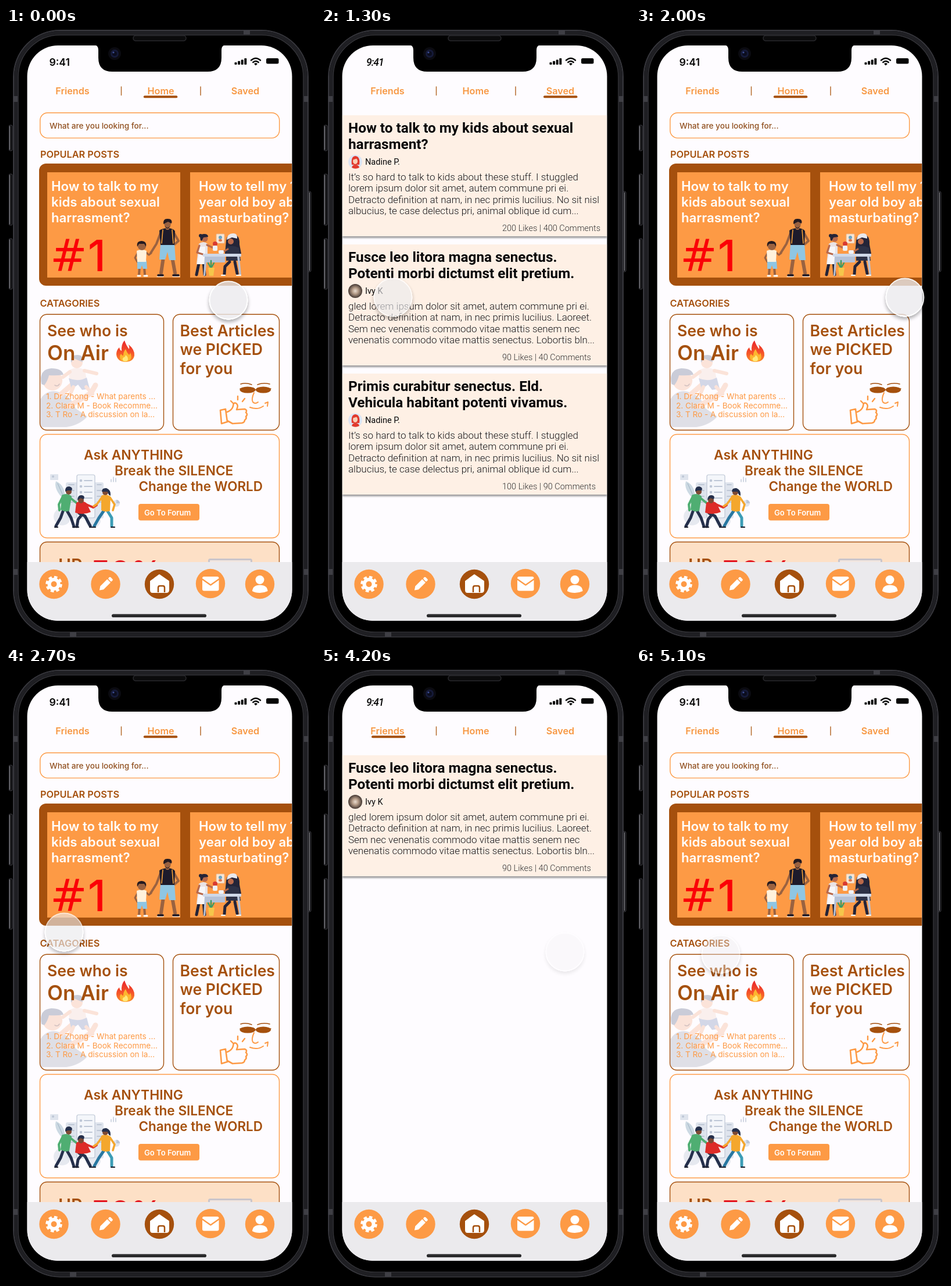
Recreate the animation shown at these times as an HTML page. Size 532x1052 px, loop 5200 ms.

```html
<!DOCTYPE html>
<html lang="en">
<head>
<meta charset="utf-8">
<title>Parenting app swipe</title>
<style>
html, body { margin: 0; width: 100%; height: 100%; overflow: hidden; background: #000; }
svg { display: block; width: 100%; height: 100%; }
text { white-space: pre; }
.ui { font-family: Inter, "Open Sans", sans-serif; font-weight: 600; }
.post { font-family: Roboto, Arial, sans-serif; }
.head { font-size: 24.3px; font-weight: 700; fill: #060608; }
.name { font-size: 14.5px; fill: #060608; }
.body { font-size: 17px; font-weight: 300; fill: #17171a; }
.likes { font-size: 14.5px; font-weight: 300; fill: #333; }
</style>
</head>
<body>
<svg id="stage" viewBox="0 0 532 1052"></svg>
<script>
const ORANGE = '#fd9a45', BROWN = '#a5500d', PAGE = '#fefcff', PITCH = 456.4;

const p = (d, fill, extra = '') => `<path d="${d}" fill="${fill}" ${extra}/>`;
const line = (d, color, w) => p(d, 'none', `stroke="${color}" stroke-width="${w}" stroke-linecap="round" stroke-linejoin="round"`);
const dot = (x, y, r, fill) => `<circle cx="${x}" cy="${y}" r="${r}" fill="${fill}"/>`;
const oval = (x, y, rx, ry, fill) => `<ellipse cx="${x}" cy="${y}" rx="${rx}" ry="${ry}" fill="${fill}"/>`;
const box = (x, y, w, h, r, fill, stroke = 'none', sw = 1.4) =>
  `<rect x="${x}" y="${y}" width="${w}" height="${h}" rx="${r}" fill="${fill}" stroke="${stroke}" stroke-width="${sw}"/>`;
const ui = (x, y, size, color, s, extra = '') =>
  `<text class="ui" x="${x}" y="${y}" font-size="${size}" fill="${color}" ${extra}>${s}</text>`;
const rows = (x, y, step, size, color, list, extra) =>
  list.map((s, i) => ui(x, y + i * step, size, color, s, extra)).join('');

// The "soft" shadow is cut out under the shape, so it never shows through a translucent fill.
const defs = `<defs>
  <clipPath id="screen">${box(36.5, 30, 456, 989, 53, '#fff')}</clipPath>
  <clipPath id="view"><rect x="36.5" y="128" width="456" height="790"/></clipPath>
  <clipPath id="live">${box(59, 493, 212, 197, 11, '#fff')}</clipPath>
  <filter id="lift" x="-10%" y="-10%" width="120%" height="125%"><feDropShadow dx="0" dy="3" stdDeviation="1.5" flood-color="#000" flood-opacity=".38"/></filter>
  <filter id="soft" x="-30%" y="-30%" width="160%" height="170%">
    <feComponentTransfer in="SourceAlpha" result="solid"><feFuncA type="linear" slope="1.6"/></feComponentTransfer>
    <feOffset in="solid" dy="4"/><feGaussianBlur stdDeviation="3"/><feComposite in2="solid" operator="out"/>
    <feComponentTransfer result="shade"><feFuncA type="linear" slope=".32"/></feComponentTransfer>
    <feMerge><feMergeNode in="shade"/><feMergeNode in="SourceGraphic"/></feMerge>
  </filter>
  <radialGradient id="fur"><stop offset="0" stop-color="#e9dccf"/><stop offset=".45" stop-color="#b39a86"/><stop offset="1" stop-color="#443833"/></radialGradient>
  <linearGradient id="flame" x1="0" y1="0" x2="0" y2="1"><stop offset="0" stop-color="#e8262c"/><stop offset=".55" stop-color="#f4512a"/><stop offset="1" stop-color="#fb8b27"/></linearGradient>
</defs>`;

function walkers() {
  const skin = '#9a6240', hair = '#241a20', jeans = '#8fc6e3';
  return line('M267 350L259 371L249 387', skin, 4) + line('M289 352L297 366L290 372', skin, 4)
    + line('M271 394L267 421M286 394L291 421', skin, 6)
    + p('M266 371H290L292 399H281L278 385L274 398H264Z', jeans)
    + p('M264 348Q270 344 278 344Q287 344 291 349L290 373H266Z', '#1d1b2b')
    + line('M270 347L268 370M286 347L288 370', '#f6a23a', 1.6)
    + box(275, 339, 6, 8, 2, skin) + dot(278, 336, 6, skin)
    + p('M271 337Q270 327 279 328Q287 328 285 336L279 333Z', hair) + p('M273 339Q278 348 284 338L282 342Q278 347 274 342Z', hair)
    + line('M262 425H270M288 425H297', '#1d1b2b', 3.6) + line('M260 427.5H271M287 427.5H299', '#fff', 1.2)
    + line('M239 384L246 390L250 387M227 386L222 395L226 402', skin, 3)
    + line('M230 410L229 424M238 410L239 424', skin, 4)
    + p('M226 400H242L243 414H236L234 408L232 414H226Z', jeans)
    + p('M225 383Q234 379 242 383L241 402H226Z', '#fff2dc')
    + dot(234, 375, 7, skin) + p('M226 376Q224 366 234 366Q243 367 241 376L238 371L229 371Z', hair)
    + line('M227 426H231M238 426H243', '#fff', 3);
}

function kitchen() {
  const skin = '#b9694a', ink = '#242438', desk = '#cfd8e8', shade = '#b5c1d6';
  return box(362, 354, 14, 16, 1, '#f8e6d5', '#e7b58c', 1) + dot(369, 360, 3, '#6aa4c4') + box(366, 363, 6, 4, 2, '#da7755')
    + line('M333 400L328 424M340 400L342 424', ink, 5)
    + p('M332 371Q340 365 347 371L347 391L344 406H328Z', '#e9e3e6') + p('M334 376H343L342 406H329Z', '#f8f6f8')
    + line('M333 374L329 386L339 389M346 373L357 378', skin, 3.2)
    + dot(342, 362, 5.5, skin) + p('M335 365Q332 354 341 354Q348 354 348 359L340 360L337 366Z', ink) + dot(335, 357, 3, ink)
    + dot(360, 371, 4, '#d83b31') + box(356, 374, 8, 9, 2, '#f0f2f8')
    + p('M379 366Q380 354 391 354Q403 356 402 372L405 388Q390 396 377 388Z', ink)
    + dot(387, 367, 5, skin) + p('M380 364Q381 353 391 353Q399 353 398 362L389 360Z', '#e9e9ee')
    + p('M379 377Q390 372 401 378L404 400H379Z', '#2d3146') + line('M382 380L373 385', skin, 3)
    + line('M385 402L377 410L376 423M394 402L398 422', ink, 5)
    + box(339, 388, 66, 5, 1, desk) + p('M342 393H346L343 426H340ZM398 393H402L405 426H402Z', shade) + box(345, 393, 32, 10, 0, shade)
    + box(366, 382, 9, 6, 2, '#f0f2f8')
    + line('M353 413L348 404M353 413V400M353 413L358 404', '#3f9b63', 2.5) + p('M348 412H359L357 426H350Z', '#f5c64b')
    + line('M371 425H377M397 425H404', '#fff', 2);
}

function cuddle() {
  const skin = '#f6b795', cloth = '#a9adba', hair = '#6f7894';
  return `<g opacity=".36" clip-path="url(#live)">`
    + p('M58 686V640Q70 619 92 626Q112 632 120 654L140 668Q126 683 104 686Z', cloth)
    + line('M108 650L146 628L154 614', skin, 9) + line('M92 632L122 606', skin, 9)
    + dot(80, 606, 17, skin) + p('M61 612Q56 587 78 585Q96 585 99 596Q86 598 74 597Q72 606 66 614Z', hair)
    + p('M108 589Q121 580 136 588L139 606Q124 613 109 606Z', '#f3d9cc') + p('M108 602Q124 609 139 601L144 620L131 622L124 613L113 621Z', '#8896bd')
    + line('M110 591L98 600M135 589L156 594', skin, 6) + line('M116 617L110 631M138 617L149 629', skin, 6)
    + dot(122, 575, 10, skin) + p('M112 575Q110 562 123 562Q134 562 132 574Q123 571 118 568Z', hair)
    + line('M84 614Q89 617 92 612', '#8b5c52', 1.5) + '</g>';
}

function flame() {
  return p('M204 537Q207 546 212 552Q213 548 211 544Q222 553 221 563Q219 574 205 574Q191 573 190 561Q190 554 195 549Q196 554 199 555Q198 544 204 537Z', 'url(#flame)')
    + p('M206 552Q208 558 212 562Q214 560 214 558Q218 567 213 571Q205 576 198 571Q194 565 198 560Q200 564 202 563Q202 556 206 552Z', '#fdb62f')
    + p('M206 562Q212 567 209 572Q204 575 201 571Q200 567 203 566Q205 566 206 562Z', '#ffe97a');
}

function likeFace() {
  return line('M369 657L378 655L381 677L371 680ZM381 660Q389 657 391 650Q391 643 396 645Q401 648 397 656L411 655Q416 657 413 661Q417 664 413 668Q415 671 411 674Q411 678 406 679L390 680L381 675', ORANGE, 2.6)
    + line('M387 641L391 645M399 633V639M411 637L407 642', ORANGE, 2.4)
    + line('M404 612Q413 609 423 613M433 613Q443 609 454 612', BROWN, 1.6)
    + oval(416, 622, 13.5, 5.5, BROWN) + oval(443, 622, 13, 5.5, BROWN)
    + line('M403 620L429 622L456 620', BROWN, 1.4)
    + line('M427 627Q422 638 425 643Q429 647 434 643', ORANGE, 2)
    + line('M420 652Q433 657 443 650M446 645L451 643L450 650', ORANGE, 2);
}

function forumArt() {
  const pale = '#dfe4ed', mid = '#bec7d6', navy = '#25304c', skin = '#7d4a34';
  return dot(97, 840, 15, '#e6e9f0') + dot(150, 846, 13, '#e6e9f0')
    + box(76, 767, 14, 10, 1, pale) + dot(81, 771, 2, mid) + line('M181 780V776M185 780V772M189 780V774', mid, 1.4)
    + dot(190, 817, 6, pale) + p('M190 817V811A6 6 0 0 1 196 817Z', mid)
    + box(103, 781, 65, 62, 3, pale) + box(122, 768, 31, 74, 3, '#f4f6fa', mid, 1.2)
    + [778, 788, 798, 808].map(y => dot(129, y, 2.3, mid) + line(`M135 ${y}H148M108 ${y + 7}H117M157 ${y + 7}H164`, mid, 1.8)).join('')
    + p('M101 812Q81 793 86 779Q104 787 101 812Z', '#ccd9e3') + line('M89 783L101 810', '#9eb3c3', 1)
    + line('M99 828L94 842L86 856M104 828L112 842L117 857', navy, 5)
    + p('M96 803Q105 798 113 805L109 830Q101 833 94 828Z', '#4fae72') + line('M97 807L91 819L92 829M111 808L121 816', '#4fae72', 4)
    + dot(108, 797, 5, skin) + p('M102 797Q101 788 109 788Q116 790 113 795L106 795Z', navy)
    + line('M126 834L136 839L145 856M131 836L124 845L122 857', navy, 5)
    + p('M121 816Q130 810 139 817L146 832Q132 838 119 833Z', '#dd2c28') + line('M138 819L150 824L156 820', '#dd2c28', 4)
    + dot(129, 812, 5, skin) + p('M123 812Q123 803 130 803Q137 804 134 810L128 808Z', navy)
    + line('M169 829L160 842L152 856', '#2877a0', 5) + line('M174 829L182 842L182 856', '#3c9cb5', 5)
    + p('M164 804Q173 799 180 806L179 830Q171 833 164 829Z', '#f4a72e') + line('M165 807L157 818L151 822M179 807L187 819L184 829', '#f4a72e', 3.6)
    + dot(171, 798, 5, skin) + p('M165 797Q165 790 173 791Q181 794 180 804Q176 803 175 797Z', navy)
    + line('M84 858H89M115 858H121M120 858H125M144 858H149M149 858H154M181 858H187', '#161b2a', 2.2);
}

function homePage() {
  return '<g clip-path="url(#view)">'
    + box(58.7, 145.7, 412, 43.4, 13, PAGE, ORANGE)
    + ui(75, 172.5, 13.6, '#91501f', 'What are you looking for...', 'style="font-weight:500"')
    + ui(59, 222.5, 16.3, BROWN, 'POPULAR POSTS') + ui(58.5, 478.5, 16.3, BROWN, 'CATAGORIES')
    + box(57, 233, 480, 210, 12, BROWN) + box(71, 248, 229, 181, 0, ORANGE) + box(317, 248, 229, 181, 0, ORANGE)
    + rows(78, 280, 27.2, 22.2, '#fff', ['How to talk to my', 'kids about sexual', 'harrasment?'])
    + rows(332, 280, 27.2, 22.2, '#fff', ['How to tell my 13', 'year old boy about', 'masturbating?'])
    + ui(76, 417.5, 76, '#fb0007', '#', 'style="font-family:\'DejaVu Sans\',sans-serif;font-weight:400"')
    + ui(141, 417.5, 74, '#fb0007', '1', 'style="font-weight:500"') + walkers() + kitchen()
    + box(58.5, 492.2, 213, 199, 12, PAGE, BROWN) + box(287.5, 492.2, 183, 199, 12, PAGE, BROWN)
    + cuddle() + ui(71, 529.5, 26.6, BROWN, 'See who is') + ui(71, 571, 35, BROWN, 'On Air') + flame()
    + rows(69, 638, 15.7, 13.6, ORANGE, ['1. Dr Zhong - What parents ...', '2. Clara M - Book Recomme...', '3. T Ro - A discussion on la...'], 'style="font-weight:400"')
    + rows(299.5, 529.5, 32.8, 26.6, BROWN, ['Best Articles', 'we PICKED', 'for you']) + likeFace()
    + box(58.5, 698.5, 412, 178, 12, PAGE, ORANGE) + forumArt()
    + ui(134, 742, 22.8, BROWN, 'Ask ANYTHING') + ui(187, 769, 22.6, BROWN, 'Break the SILENCE') + ui(228.5, 795.5, 22.4, BROWN, 'Change the WORLD')
    + box(228, 818, 105, 28.5, 4, ORANGE) + ui(238, 838, 13.1, '#fff', 'Go To Forum')
    + box(58.5, 883.5, 412, 100, 12, '#fde0c6', BROWN)
    + ui(90, 934, 30, BROWN, 'UP') + ui(146, 954, 54, '#e3131b', '50%') + box(349.5, 913.5, 73, 40, 2, '#f1e6e0', '#c9c5cb', 3)
    + '</g>';
}

const tale = ['It’s so hard to talk to kids about these stuff. I stuggled', 'lorem ipsum dolor sit amet, autem commune pri ei.',
  'Detracto definition at nam, in nec primis lucilius. No sit nisl', 'albucius, te case delectus pri, animal oblique id cum...'];
const fusce = {
  head: ['Fusce leo litora magna senectus.', 'Potenti morbi dictumst elit pretium.'], name: 'Ivy K', likes: '90 Likes | 40 Comments',
  body: ['gled lorem ipsum dolor sit amet, autem commune pri ei.', 'Detracto definition at nam, in nec primis lucilius. Laoreet.',
    'Sem nec venenatis commodo vitae mattis senem nec', 'venenatis commodo vitae mattis senectus. Lobortis bln...']
};
const saved = [
  { head: ['How to talk to my kids about sexual', 'harrasment?'], name: 'Nadine P.', body: tale, likes: '200 Likes | 400 Comments', drawn: true },
  fusce,
  { head: ['Primis curabitur senectus. Eld.', 'Vehicula habitant potenti vivamus.'], name: 'Nadine P.', body: tale, likes: '100 Likes | 90 Comments', drawn: true }
];

const redhead = dot(59, 230, 12, '#dce5f4')
  + p('M53 235Q51 221 59 220Q68 221 66 235Z', '#e2392c') + oval(59, 229, 4, 5, '#f8cdb5')
  + p('M53 240Q54 235 59 235Q65 235 66 240Q59 243.5 53 240Z', '#e2392c') + line('M55 225Q60 225 62 222', '#e2392c', 2);

function post(item, i) {
  const t = (cls, x, y, s) => `<text class="post ${cls}" x="${x}" y="${y}">${s}</text>`;
  return `<g transform="translate(0 ${i * 222})"><g filter="url(#lift)">${box(36.5, 150, 456, 208, 0, '#fef0e5')}</g>`
    + item.head.map((s, n) => t('head', 47, 180 + n * 28, s)).join('')
    + (item.drawn ? redhead : dot(59, 230, 12, 'url(#fur)')) + t('name', 76, 235, item.name)
    + item.body.map((s, n) => t('body', 47, 261.5 + n * 19.5, s)).join('')
    + t('likes', 312, 348.5, item.likes) + '</g>';
}

function phone() {
  const key = (x, y, h, side) => box(x, y, 6, h, 2, '#111113', '#3b3b40', 1) + line(`M${side} ${y + 2}V${y + h - 2}`, '#98989f', 1);
  return box(0, 0, 532, 1052, 0, '#000')
    + key(5, 167, 44, 6.5) + key(5, 251, 88, 6.5) + key(5, 362, 87, 6.5) + key(519, 281, 138, 522.5)
    + box(13, 4, 507, 1042.5, 80, '#000', '#38383e', 2)
    + box(17, 8, 499, 1034.5, 76, 'none', '#1f1f23', 6) + box(21, 12, 491, 1026.5, 72, 'none', '#36363b', 1.5)
    + [[12, 117], [513, 117], [12, 930], [513, 930]].map(([x, y]) => box(x, y, 8, 10, 0, '#3f3f45')).join('')
    + box(409, 4, 11, 7, 0, '#3f3f45') + box(110, 1039, 11, 7, 0, '#3f3f45')
    + box(219, 13, 91, 9, 4.5, '#0b0b0c', '#29292d', 1.5);
}

function statusBar() {
  return p('M152 29Q159 30 159 38V51Q159 75 183 75H347Q371 75 371 51V38Q371 30 378 29Z', '#000')
    + dot(187, 44, 11, '#0b0b11') + dot(187, 44, 7, '#151a39') + dot(187, 44, 4, '#0b0d1e') + dot(185, 42, 1.6, '#3c4d93')
    + [0, 1, 2, 3].map(i => box(393.5 + i * 5.6, 59 - i * 2.3, 4, 4 + i * 2.3, 1, '#060606')).join('')
    + line('M422 55.5Q430 48.5 438 55.5M425.3 59Q430 55 434.7 59', '#060606', 2.5) + p('M427 61.5Q430 59 433 61.5L430 64.5Z', '#060606')
    + box(448, 52, 21.5, 9.5, 2.5, '#060606')
    + ui(74.5, 64.5, 17.6, '#060606', '9:41', 'id="clock"')
    + `<text id="slant" class="post" x="78" y="64.5" font-size="17.5" font-style="italic" font-weight="500" letter-spacing="-1" fill="#060606">9:41</text>`;
}

function tabs() {
  const tab = (x, s) => ui(x, 113.5, 16.2, '#f79843', s, 'text-anchor="middle"');
  return tab(114.5, 'Friends') + tab(266.5, 'Home') + tab(412, 'Saved')
    + line('M198.5 101V115.5M335 101V115.5', '#b56a2c', 1.5)
    + `<rect id="mark" y="116.3" width="58.5" height="4" rx="2" fill="${BROWN}"/>`;
}

function dock() {
  return box(36, 918, 457, 102, 0, '#ebeaed')
    + [[82.5, 956], [171.5, 956], [264, 956], [352, 955], [437, 956]].map(([x, y], i) => dot(x, y, 25.2, i === 2 ? BROWN : ORANGE)).join('')
    + `<g fill="none" stroke="#fff"><circle cx="82.5" cy="956" r="8" stroke-width="6"/><circle cx="82.5" cy="956" r="12" stroke-width="4.5" stroke-dasharray="5.4 4.025"/></g>`
    + `<g transform="translate(171.5 956) rotate(45)">${p('M-4 -8H4V9L0 15L-4 9Z', '#fff')}${box(-4, -14.5, 8, 5, 2, '#fff')}</g>`
    + p('M264 940L280 951V966Q280 970 276 970H252Q249 970 249 966V951Z', '#fff', 'stroke="#fff" stroke-width="2" stroke-linejoin="round"')
    + p('M262 970V962Q262 959 265 959H270Q273 959 273 962V970', 'none', `stroke="${BROWN}" stroke-width="2.5"`)
    + box(338, 943, 28.5, 24.5, 3, '#fff') + line('M338 947.5L352.3 957.5L366.5 947.5', ORANGE, 2.2)
    + dot(437, 948.5, 7.5, '#fff') + p('M424 968Q425 957.5 437 957.5Q450 957.5 450.5 968Q444 971 437 971Q429 971 424 968Z', '#fff')
    + box(182, 1007.5, 163, 5.6, 2.8, '#2a2a2c');
}

const stage = document.getElementById('stage');
stage.innerHTML = defs + phone()
  + `<g clip-path="url(#screen)">${box(36, 29, 457, 991, 0, PAGE)}
  <g clip-path="url(#view)"><g id="page0">${post(fusce, 0)}</g><g id="page1">${homePage()}</g><g id="page2">${saved.map(post).join('')}</g></g>
  ${tabs()}${dock()}${statusBar()}</g>
  <g id="touch" filter="url(#soft)"><circle r="32.5" fill="#ebebed" fill-opacity=".79" stroke="#fff" stroke-width="1.8" stroke-opacity=".9"/></g>`;
const get = id => document.getElementById(id);

// Each swipe: finger path, page change, and times for press, drag, snap and lift.
const swipes = [
  { from: 1, to: 2, a: [383, 468], b: [72, 463], gain: 1, press: [-200, -50], drag: [0, 600], snap: 950, lift: [700, 900] },
  { from: 2, to: 1, a: [124, 463], b: [463, 463], gain: 1, press: [1100, 1350], drag: [1300, 1800], snap: 2000, lift: [2050, 2300] },
  { from: 1, to: 0, a: [100, 454], b: [525, 460], gain: 1.016, press: [2450, 2760], drag: [2700, 3500], snap: 3750, lift: [3750, 3950] },
  { from: 0, to: 1, a: [420, 488], b: [146, 492], gain: 0.996, press: [4150, 4350], drag: [4390, 4840], snap: 5050, lift: [4980, 5220] }
];
const ramp = (t, a, b) => Math.min(1, Math.max(0, (t - a) / (b - a)));
const smooth = u => u * u * (3 - 2 * u);
const easeOut = u => 1 - (1 - u) ** 3;
const mix = (a, b, u) => a + (b - a) * u;

function draw(t) {
  let pos = 1, alpha = 0, x = 0, y = 0;
  for (const s of swipes) {
    if (t < s.press[0]) break;
    const u = smooth(ramp(t, ...s.drag));
    x = mix(s.a[0], s.b[0], u);
    y = mix(s.a[1], s.b[1], u);
    const dragged = s.from - (x - s.a[0]) * s.gain / PITCH;
    pos = mix(dragged, s.to, easeOut(ramp(t, s.drag[1], s.snap)));
    alpha = ramp(t, ...s.press) * (1 - ramp(t, ...s.lift));
  }
  for (let i = 0; i < 3; i++) {
    const g = get('page' + i), off = (i - pos) * PITCH;
    g.setAttribute('transform', `translate(${off.toFixed(2)} 0)`);
    g.setAttribute('visibility', Math.abs(off) < PITCH - 0.5 ? 'visible' : 'hidden');
  }
  get('mark').setAttribute('x', pos < 1 ? mix(87, 236.8, pos) : mix(236.8, 383, pos - 1));
  const home = 1 - Math.abs(pos - 1);
  get('clock').setAttribute('opacity', home);
  get('slant').setAttribute('opacity', 1 - home);
  get('touch').setAttribute('transform', `translate(${x.toFixed(2)} ${y.toFixed(2)})`);
  get('touch').setAttribute('opacity', alpha);
}

const start = performance.now();
function tick() {
  const t = (performance.now() - start) % 5200;
  draw(Math.floor(t / 100) * 100);
  requestAnimationFrame(tick);
}
tick();
</script>
</body>
</html>
```
